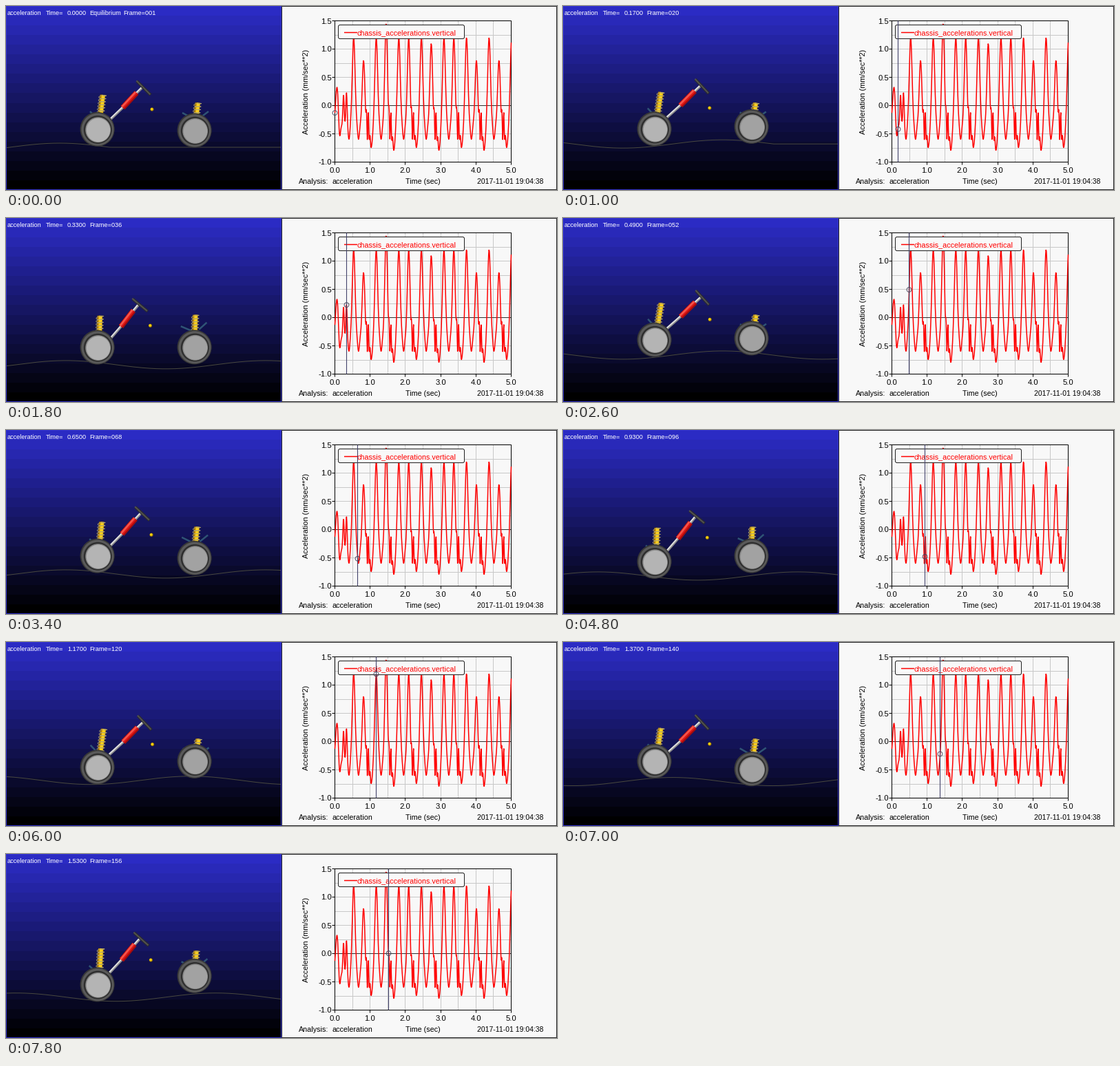
Animation of 800x267 px, one loop 8000 ms. Source, as a matplotlib script:

```python
import numpy as np
import matplotlib.pyplot as plt
from matplotlib.animation import FuncAnimation
from matplotlib.patches import Circle, FancyBboxPatch, Rectangle
from matplotlib.transforms import Affine2D

W, H, DPI = 800, 267, 100
PT = 72 / DPI
FRAMES, STEP = 40, 200

plt.rcParams["font.family"] = "Liberation Sans"
plt.rcParams["path.snap"] = False
fig = plt.figure(figsize=(W / DPI, H / DPI), dpi=DPI)
ax = fig.add_axes([0, 0, 1, 1])
ax.set_xlim(0, W)
ax.set_ylim(H, 0)
ax.axis("off")


def line(xs, ys, color, width=1.0, z=2, **kw):
    kw.setdefault("solid_capstyle", "butt")
    return ax.plot(xs, ys, color=color, lw=width * PT, zorder=z, **kw)[0]


def rect(x, y, w, h, z=0, fill="none", edge="none"):
    return ax.add_patch(Rectangle((x, y), w, h, fc=fill, ec=edge, lw=PT, zorder=z))


def disc(x, y, r, color, z, **kw):
    return ax.add_patch(Circle((x, y), r, fc=color, lw=0, zorder=z, **kw))


def label(x, y, s, px=10.8, color="black", z=6, **kw):
    kw.setdefault("va", "baseline")
    return ax.text(x, y, s, fontsize=px * PT, color=color, zorder=z, **kw)


def bump(x, centre, width):
    return np.exp(-((x - centre) / width) ** 2 / 2)


# ---------- model view ----------
BANDS = 19
for i in range(BANDS):
    k = 1 - i / (BANDS - 1)
    top = round(i * H / BANDS)
    rect(0, top, 400, H - top, 0, (0.17 * k, 0.17 * k, 0.77 * k))
rect(0.5, 0.5, 399, 266, 7, edge="#3333cc")

label(2, 13, "acceleration", 9.1, "white")
label(58, 13, "Time=", 9.1, "white")
clock = label(89, 13, "", 9.1, "white")
note = label(121, 13, "", 9.1, "white")
counter = label(121, 13, "", 9.1, "white")

road_x = np.linspace(1, 399, 300)
road = line(road_x, road_x * 0, "#48483f", 1, 2)

# the chassis pitches about the rear hub
pitch = Affine2D()
body = pitch + ax.transData


def bar(p, q, width, color, z):
    line([p[0], q[0]], [p[1], q[1]], color, width, z, transform=body)


def rod(p, q, width, shades, z):
    """Round bar: each lighter shade is narrower and nearer the upper left."""
    for i, color in enumerate(shades):
        d = 0.6 * i
        bar((p[0] - d, p[1] - d), (q[0] - d, q[1] - d), width * (1 - i / len(shades)), color, z + i / 10)


def strut(x, y, length):
    lean = 0.12 * length
    low = (x - lean, y + length)
    bar((x, y), low, 7.5, "#b98400", 3)
    bar((x + 0.8, y), (low[0] + 0.8, low[1]), 4.5, "#ffd21c", 3.1)
    s = np.linspace(0, 1, 240)
    turn = 2 * np.pi * s * length / 4.4
    line(x - lean * s + 5.4 * np.sin(turn), y + length * s + 1.3 * np.cos(turn),
         "#b5a766", 0.8, 3.3, transform=body)


strut(140.5, 129, 42)
strut(278.5, 140.5, 30)
for p, q in [((122, 153), (132, 163)), ((256, 155), (271, 163)), ((282, 162), (294, 153))]:
    bar(p, q, 2.5, "#2f5475", 2.6)

STEEL = ["#8c8c8c", "#e0e0e0"]
rod((150, 166), (172, 145), 3.8, STEEL, 3)
rod((186, 130), (199, 117), 3.8, STEEL, 3)
rod((169.5, 147.5), (189.5, 126), 8, ["#a40c0c", "#e01616", "#f2564c"], 3.4)
rod((190, 109), (210, 129), 4.2, ["#2a2a2a", "#505050"], 3.7)
disc(212, 150, 2.6, "#8f6d00", 4, transform=body)
disc(211.7, 149.7, 1.9, "#f4cf10", 4.1, transform=body)


def make_wheel(hub):
    rings = [(25, "#383838"), (23.5, "#5a5a5a"), (20.5, "#2e2e2e"), (18.4, "#8a8a8a"), (17.2, hub)]
    return [disc(0, 0, r, c, 5 + i / 50) for i, (r, c) in enumerate(rings)]


def place(wheel, x, y):
    for i, part in enumerate(wheel):
        part.center = (x + 0.35 * i, y + 0.3 * i)


front, rear = make_wheel("#b4b4b4"), make_wheel("#a2a2a2")
PERIOD, WAVE, EDGE = 0.32, 290, 150.5


def motion(t):
    """Road level and chassis pitch: a bounce per wave plus its half-rate sway."""
    grow = min(1, t / 0.2)
    w = 2 * np.pi / PERIOD
    sway = np.cos(w * t / 2)
    level = 205 + grow * (6 * np.cos(w * t) - 2 * sway)
    angle = grow * (0.012 + 0.055 * np.cos(w * (t + 0.012)) - 0.03 * sway)
    return level, angle


def road_y(x, t, level):
    """Sine road arriving from the left, flat ahead of its edge."""
    d = EDGE + WAVE * t / PERIOD - x
    return level - 6 * np.sin(2 * np.pi * np.maximum(d, 0) / WAVE)


# ---------- plot ----------
X0, X1, Y0, Y1 = 477.5, 733.5, 21.5, 226.5


def px(t):
    return X0 + (X1 - X0) * t / 5


def py(a):
    return Y1 - (Y1 - Y0) * (a + 1) / 2.5


def crisp(v):
    return np.floor(v) + 0.5


rect(400, 0, 400, H, 0.5, "#f8f8f8")
rect(400.5, 0.5, 399, 266, 7, edge="#202020")
for i in range(1, 10):
    x, y = crisp(px(i / 2)), crisp(py(-1 + i / 4))
    line([x, x], [Y0, Y1], "#c8c8c8", 1, 1)
    line([X0, X1], [y, y], "#c8c8c8", 1, 1)
line([X0, X1], [crisp(py(0))] * 2, "#303030", 1, 1.2)
rect(X0, Y0, X1 - X0, Y1 - Y0, 1.5, edge="black")

for i in range(6):
    x, y = crisp(px(i)), crisp(py(-1 + i / 2))
    line([x, x], [Y1, Y1 + 4], "black")
    line([X0 - 4, X0], [y, y], "black")
    label(x, 242, f"{i:.1f}", 11.3, ha="center")
    label(473, y + 4, f"{-1 + i / 2:.1f}", 11.3, ha="right")
label(425, 258, "Analysis:")
label(473, 258, "acceleration")
label(580, 258, "Time (sec)")
label(684.5, 258, "2017-11-01 19:04:38", 10.4)
label(436, 124.5, "Acceleration (mm/sec**2)", 10.9, rotation=90, ha="center", va="center")

FIRST, CYCLE = 0.533, 0.64
REST = -0.35
MINOR_PEAKS = [0.8, 1.45, 1.2, 1.1, 1.2, 0.8, 0.8]
SETTLING = [(0.06, 0.04, 0.68), (0.13, 0.025, -0.3), (0.245, 0.018, 0.55),
            (0.33, 0.018, 0.58), (0.4, 0.025, -0.25)]


def accel(t):
    """Vertical acceleration: settling, then tall and lesser peaks in turn."""
    a = REST + sum(h * bump(t, c, w) for c, w, h in SETTLING)
    for k in range(8):
        d = t - FIRST - k * CYCLE
        a = a + 1.55 * bump(d, 0, 0.039)
        a = a - 0.25 * bump(d, 0.137, 0.025) - (0.38 + 0.05 * (k % 2)) * bump(d, 0.5, 0.036)
        a = a + 0.28 * np.cos(2 * np.pi * (d - 0.36) / 0.055) * bump(d, 0.4, 0.04)
        if k < len(MINOR_PEAKS):
            a = a + (MINOR_PEAKS[k] - REST) * bump(d, 0.28, 0.037)
    return a


ts = np.arange(0, 5.001, 0.01)
line(px(ts), py(accel(ts)), "#ff0000", 1.5, 3, solid_joinstyle="round")

ax.add_patch(FancyBboxPatch((484.5, 29.5), 179, 16, boxstyle="round,pad=2,rounding_size=2.5",
                            fc="#f9f9f9", ec="#202020", lw=PT, zorder=4))
line([491, 510], [38.5, 38.5], "#ff0000", 1.5, 4.5)
label(510, 42, "chassis_accelerations.vertical", 10.75, "#ff0000", 4.5)

cursor = line([X0, X0], [Y0, Y1], "#44446c", 1.1, 5)
marker = ax.add_patch(Circle((X0, 145), 3.4, fc="none", ec="#44445c", lw=0.9 * PT, zorder=5.1))


def draw(n):
    num = 4 * n if n else 1
    t = 0.01 * (num - 3) if n else 0.0
    level, angle = motion(t)
    bounce = level - 205

    clock.set_text(f"{t:.4f}")
    note.set_text("" if n else "Equilibrium")
    counter.set_text(f"Frame={num:03d}")
    counter.set_x(121 if n else 170)

    road.set_ydata(road_y(road_x, t, level))
    pitch.clear().rotate_around(278, 180, -angle)
    place(front, 132.6, road_y(133, t, level) + 0.25 * bounce - 24)
    place(rear, 273.6, road_y(274, t, level) - 0.6 * bounce - 24.5)

    x = crisp(px(t))
    cursor.set_xdata([x, x])
    cursor.set_visible(n > 0)
    marker.center = (x, py(accel(t)))
    return []


anim = FuncAnimation(fig, draw, frames=FRAMES, interval=STEP, repeat=True,
                     repeat_delay=0, init_func=lambda: draw(0), blit=False)
plt.show()
```
